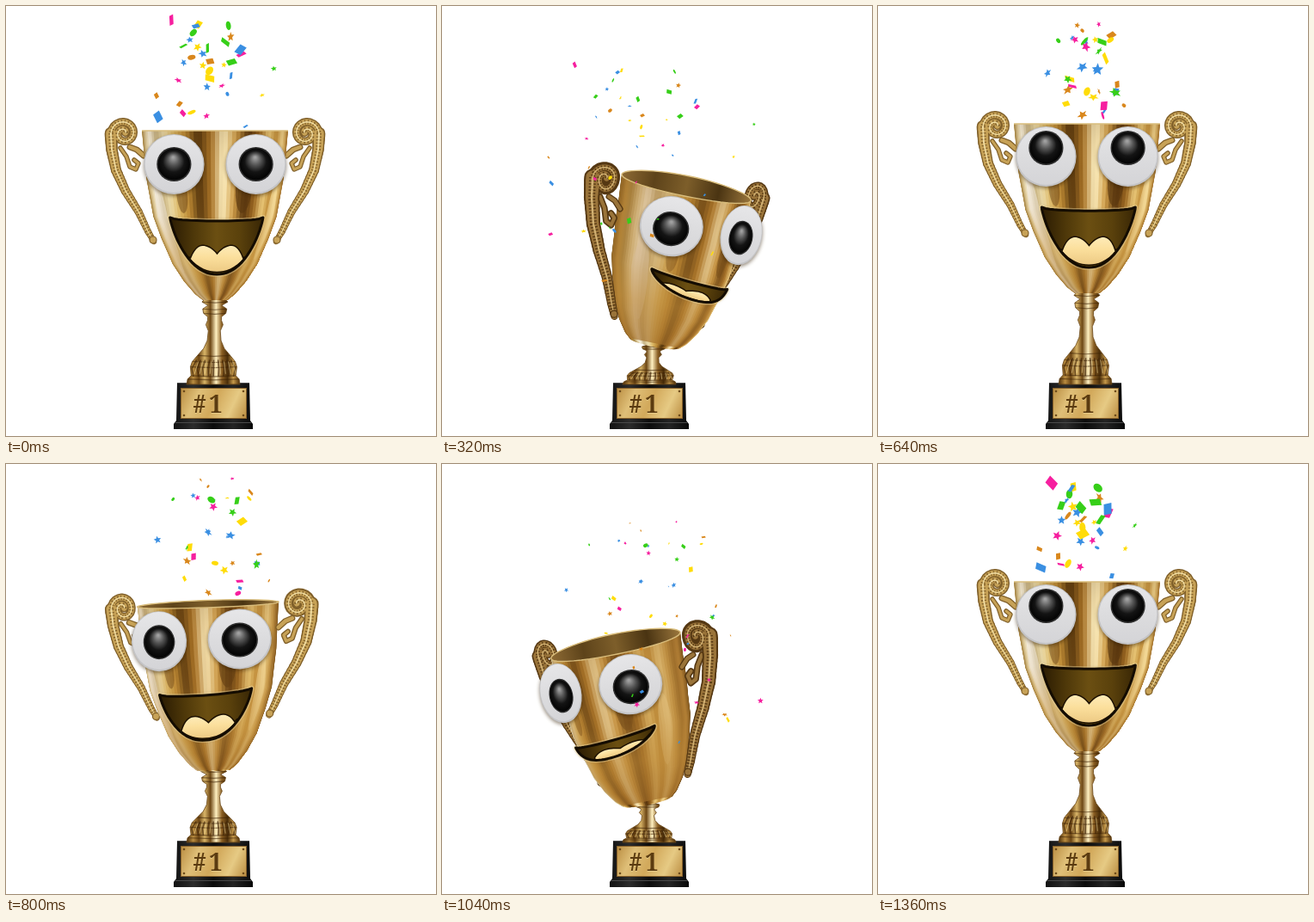
Recreate the animation shown at these times as an HTML page with a canvas. Size 500 by 500 pixels, loop 1440 ms.

```html
<!DOCTYPE html>
<html lang="en">
<head>
<meta charset="utf-8">
<title>Trophy</title>
<style>
html, body { margin: 0; width: 100%; height: 100%; overflow: hidden; background: #fff; }
canvas { position: absolute; left: 0; top: 0; width: 500px; height: 500px; }
span {
  position: absolute; left: 196px; top: 442px; width: 80px; text-align: center;
  font: 600 28px/40px "Noto Serif", serif; letter-spacing: 3px; color: #5b3b10;
  text-shadow: 0 1px 0 #e8cc88;
}
</style>
</head>
<body>
<canvas id="stage" width="500" height="500"></canvas><span>#1</span>
<script>
const ctx = document.getElementById('stage').getContext('2d');
const STEP = 80, HALF = 9, STEPS = 18, DEG = Math.PI / 180;
const { sin, cos, abs, min, max, PI } = Math;

// One sway: cup bottom, roll, yaw, pitch, mouth depth, face shift, eye shift, pupil shift
const SWAY = [
  [342, 0, 0, 0, 66, 0, 0, 0],
  [356, 2, 9, 3, 57, 0, 0, 1],
  [369, 4, 17, 5, 49, 0, 0, 3],
  [382, 8, 23, 8, 34, 2, 0, 3],
  [392, 11.5, 27, 9, 22, 3, 0, 3],
  [360, 6, 15, 5, 50, 0, 0, 0],
  [319, 0, 0, 0, 78, -10, -11, -6],
  [326, 0, 0, 0, 73, -7, -6, -11],
  [334, 0, 0, 0, 70, -4, -1, -10]
];
const CUP = [[0, 84], [55, 79], [100, 71], [125, 62], [155, 49], [175, 36], [190, 23], [197, 14]];
const STEM = [[0, 11], [4, 15], [8, 8], [12, 14], [17, 13], [21, 8], [25, 8], [30, 10], [37, 7],
  [48, 8], [57, 12], [65, 19], [72, 25], [78, 27], [88, 26], [92, 30], [98, 31]];
const BAND = [[-120, 22], [-115, 46], [-104, 70], [-89, 94], [-78, 117], [-71, 129]];
const GOLD = ('8c6426 b5893c a58648 dcc896 fbf6e6 c4b183 efe0b0 dcb864 b98632 4f300a a87226 ' +
  'fff3c6 cf9d48 512f0a 97631f edcd7e c08c38 f3d792 cb9f50 94682a b3823a 7a5520')
  .split(' ').map(h => [0, 2, 4].map(i => parseInt(h.substr(i, 2), 16)));
const PAPER = ['#d9871c', '#3a8fe2', '#f61f9f', '#36cf18', '#ffdc08'];

const mix = (a, b, t) => a + (b - a) * t;

function radius(y) {
  let i = 1;
  while (i < CUP.length - 1 && CUP[i][0] < y) i++;
  const [a, b] = [CUP[i - 1], CUP[i]];
  return mix(a[1], b[1], min(1, (y - a[0]) / (b[0] - a[0])));
}

function goldAt(deg) {
  const f = min(0.999, max(0, (deg + 95) / 190)) * (GOLD.length - 1), i = f | 0;
  return `rgb(${GOLD[i].map((c, n) => mix(c, GOLD[i + 1][n], f - i) | 0)})`;
}

function rng(seed) {
  return () => {
    seed = (seed + 0x6d2b79f5) | 0;
    let t = Math.imul(seed ^ (seed >>> 15), 1 | seed);
    t = (t + Math.imul(t ^ (t >>> 7), 61 | t)) ^ t;
    return ((t ^ (t >>> 14)) >>> 0) / 4294967296;
  };
}

function trace(pts, close = true) {
  ctx.beginPath();
  pts.forEach(p => ctx.lineTo(p[0], p[1]));
  if (close) ctx.closePath();
}

function fill(style) { ctx.fillStyle = style; ctx.fill(); }
function stroke(style, width) { ctx.strokeStyle = style; ctx.lineWidth = width; ctx.stroke(); }

function ramp(x0, y0, x1, y1, colors) {
  const g = ctx.createLinearGradient(x0, y0, x1, y1);
  colors.forEach((c, i) => g.addColorStop(i / (colors.length - 1), c));
  return g;
}

const range = (n, fn) => Array.from({ length: n + 1 }, (_, i) => fn(i / n));

function makePose(step) {
  const side = step < HALF ? 1 : -1;
  const [by, roll, yaw, pitch, mouth, face, eye, pupil] = SWAY[step % HALF];
  const r = roll * side * DEG, psi = yaw * side, p = sin(pitch * DEG), tilt = yaw / 27;
  const h = 1 - pitch * 0.006, bx = 243 + side * yaw * 0.16;
  // Point on the turned cup, in view space
  const view = (X, y, Z) => {
    X *= 1 + Z / 550;
    const Y = (y - 197) * h + Z * p;
    return [bx + X * cos(r) - Y * sin(r), by + X * sin(r) + Y * cos(r)];
  };
  // Squashing narrows the rim and swells the bottom
  const girth = y => radius(y) + tilt * mix(-8, 15, (y / 197) ** 2);
  const around = (deg, y, R = girth(y)) => view(R * sin(deg * DEG), y, R * cos(deg * DEG));
  const flat = (x, y) => view(x * cos(psi * DEG), y, -x * sin(psi * DEG));
  return { by, bx, r, psi, p, mouth, face, eye, pupil, view, around, flat, tilt, side };
}

function drawBase() {
  trace([[199, 438], [283, 438], [284, 482], [287, 486], [287, 492], [195, 492], [195, 486], [198, 482]]);
  fill(ramp(195, 0, 287, 0, ['#111', '#2c2c2c', '#0c0c0c', '#242424', '#080808']));
  ctx.fillStyle = '#4a4a4a';
  ctx.fillRect(199, 438, 84, 1);
  ctx.fillRect(197, 484, 88, 1);
  ctx.fillStyle = ramp(203, 444, 280, 480, ['#b98c40', '#dfbf78', '#d2a95b', '#e6ca84', '#b98b3f']);
  ctx.fillRect(203, 444, 77, 36);
  ctx.strokeStyle = '#86602a';
  ctx.lineWidth = 1;
  ctx.strokeRect(203.5, 444.5, 76, 35);
  for (const x of [207, 276]) for (const y of [448, 476]) {
    ctx.beginPath();
    ctx.arc(x, y, 1.3, 0, 7);
    fill('#6e4c1c');
  }
}

function drawStem(pose) {
  const k = max(0.46, (442 - pose.by) / 98);
  const at = (y, x) => [mix(241, pose.bx, (98 - y) / 98) + x, 440 - (98 - y) * k];
  trace([...STEM.map(([y, w]) => at(y, w)), ...STEM.slice().reverse().map(([y, w]) => at(y, -w))]);
  fill(ramp(211, 0, 271, 0, ['#5a3a10', '#b98c40', '#6b4514', '#d9b568', '#6e4816', '#fff0c0', '#8a5e22', '#4a2e0a', '#c6994a', '#5a3a10']));
  stroke('#6b4a1c', 0.8);
  ctx.save();
  ctx.clip();
  for (const [y, w] of STEM.filter(s => s[1] > 12)) {
    trace([at(y, -w), at(y + 1, 0), at(y, w)], false);
    stroke('rgba(60,34,5,.55)', 1.2);
  }
  for (let i = -4; i <= 4; i++) {
    trace([at(70, i * 5), at(80, i * 6.3), at(89, i * 5.8)], false);
    stroke('rgba(65,38,8,.65)', 1.6);
    trace([at(72, i * 5 + 2), at(86, i * 6 + 2)], false);
    stroke('rgba(255,235,170,.5)', 1);
  }
  ctx.restore();
}

function drawHandle(pose, side) {
  const { tilt } = pose, near = side * pose.psi < 0;
  const spiral = range(30, t => {
    const a = mix(3.9, 1, t) * PI, R = mix(2, 15, t ** 0.8);
    return [-106 + R * cos(a), 3 + R * sin(a)];
  });
  const band = [];
  for (let i = 0; i < BAND.length; i++) {
    const a = i ? BAND[i - 1] : spiral[30];
    for (let n = 1; n <= 5; n++) band.push([mix(a[0], BAND[i][0], n / 5), mix(a[1], BAND[i][1], n / 5)]);
  }
  // The lower end stretches down and tucks in as the cup leans
  const put = ([x, y]) => pose.flat(
    -side * x * (1 - tilt * (0.07 + 0.0011 * max(0, y))),
    y * (y > 0 ? 1 + 0.32 * tilt * tilt : 1));
  const curl = spiral.map(put), arm = [[-99, 19], [-91, 22], [-83, 29]].map(put);
  const leaf = [[-110, 20], [-103, 30], [-99, 42], [-92, 45], [-89, 38], [-94, 34]].map(put);
  const rail = [curl[30], ...band.map(put)];
  const bulk = near ? 1 + 0.35 * tilt : 1;
  const width = i => mix(15, 6, i / rail.length) * bulk;
  const [edge, gold, light] = tilt > 0.8 ? ['#553813', '#9a743a', '#d2b274'] : ['#80602a', '#c7a257', '#f0dca2'];
  const rib = (grow, color) => {
    for (let i = 1; i < rail.length; i++) {
      trace([rail[i - 1], rail[i]], false);
      stroke(color, max(0.8, width(i) * grow));
    }
  };
  ctx.save();
  ctx.lineCap = ctx.lineJoin = 'round';
  trace(arm, false); stroke(edge, 7); stroke(gold, 4.5);
  trace(leaf, false); stroke(edge, 5.5 * bulk); stroke(gold, 3 * bulk);
  trace(curl, false); stroke(edge, 9.5 * bulk);
  rib(1, edge);
  trace(curl, false); stroke(gold, 6.5);
  rib(0.78, gold);
  ctx.lineCap = 'butt';
  ctx.setLineDash([1.4, 2.2]);
  trace(curl, false); stroke(edge, 5);
  trace(rail, false); stroke(edge, 6 * bulk);
  ctx.setLineDash([]);
  trace(curl, false); stroke(light, 1.4);
  rib(0.14, light);
  const tip = put([-72, 127]);
  ctx.beginPath();
  ctx.arc(tip[0], tip[1], 4, 0, 7);
  fill(gold);
  stroke(edge, 1.2);
  ctx.restore();
}

function drawPatch(pose, deg, y0, y1, wide, color) {
  const a = deg + pose.psi;
  trace(range(24, t => pose.around(a + wide * sin(t * 2 * PI), mix(y0, y1, (1 - cos(t * 2 * PI)) / 2))));
  fill(color);
}

function drawCup(pose) {
  const ys = CUP.map(c => c[0]).concat(28, 78, 140, 165).sort((a, b) => a - b);
  const rightEdge = ys.map(y => pose.around(90, y)).reverse();
  for (let a = -90; a < 90; a += 3) {
    const front = range(8, t => pose.around(mix(90, a, t), 0));
    trace([...front, ...ys.map(y => pose.around(a, y)), ...rightEdge]);
    fill(goldAt(a - pose.psi));
  }
  ctx.save();
  trace([...range(24, t => pose.around(mix(90, -90, t), 0)), ...ys.map(y => pose.around(-90, y)), ...rightEdge]);
  ctx.clip();
  drawPatch(pose, -54, 62, 165, 9, 'rgba(240,236,228,.55)');
  drawPatch(pose, 23, 40, 96, 7, 'rgba(80,46,10,.65)');
  drawPatch(pose, -27, 55, 96, 5, 'rgba(100,62,18,.5)');
  drawPatch(pose, 58, 60, 150, 7, 'rgba(255,236,176,.5)');
  const top = pose.view(0, 0, 0), end = pose.view(0, 197, 0);
  ctx.fillStyle = ramp(...top, ...end, ['rgba(90,56,14,.15)', 'rgba(200,150,66,0)', 'rgba(200,150,66,.1)', 'rgba(196,146,62,.5)', 'rgba(150,100,36,.5)']);
  ctx.fillRect(0, 0, 500, 500);
  ctx.fillStyle = `rgba(176,122,46,${0.35 * pose.tilt})`;
  ctx.fillRect(0, 0, 500, 500);
  ctx.restore();

  trace(range(48, t => pose.around(t * 360, 0)));
  if (pose.p > 0) fill(ramp(...pose.around(-90, 0), ...pose.around(90, 0), ['#8d6a34', '#5d431a', '#7d5e2a', '#4a3412', '#9a763c']));
  stroke('#d9bd7c', 1.4);
}

function drawEye(pose, deg) {
  const a = deg + pose.psi;
  const [x, y] = pose.around(a, 39 + pose.eye, 80);
  const sx = min(1.06, 0.2 + 0.95 * cos(a * DEG));
  ctx.save();
  ctx.translate(x, y);
  ctx.rotate(pose.r);
  ctx.scale(sx, 1);
  const disc = (cy, R, style) => {
    ctx.beginPath();
    ctx.arc(0, cy, R, 0, 7);
    fill(style);
  };
  ctx.shadowColor = 'rgba(50,28,0,.5)';
  ctx.shadowBlur = 4;
  ctx.shadowOffsetY = 2;
  disc(0, 35, '#c4c4c6');
  ctx.shadowColor = 'transparent';
  disc(-0.6, 33.5, ramp(0, -34, 0, 34, ['#e6e6e8', '#dcdcde', '#d4d4d7']));
  const py = pose.pupil;
  disc(py, 20, '#2e2e2e');
  const g = ctx.createRadialGradient(-1, py - 8, 1, 0, py, 20);
  g.addColorStop(0, '#a0a0a0');
  g.addColorStop(0.3, '#555');
  g.addColorStop(0.6, '#141414');
  g.addColorStop(1, '#000');
  disc(py, 18.5, g);
  ctx.restore();
}

function drawMouth(pose) {
  const top = 101 + pose.face, depth = pose.mouth, lean = pose.side * pose.tilt;
  const at = (u, d) => {
    const y = top + d * depth;
    return pose.around(2 + u * 44 + pose.psi, y + 7 * u * lean, (radius(min(y, 190)) + 72) / 2);
  };
  const low = u => max(0, 1 - abs(u) ** 2.2) ** 0.65;
  const shape = [
    ...range(20, t => at(mix(-1, 1, t), 0.06 * low(mix(-1, 1, t)))),
    ...range(40, t => at(cos(t * PI), low(cos(t * PI))))
  ];
  ctx.save();
  ctx.lineJoin = 'round';
  trace(shape);
  stroke('rgba(255,232,170,.45)', 6);
  ctx.shadowColor = 'rgba(50,28,0,.6)';
  ctx.shadowBlur = 4;
  fill(ramp(...at(-1, 0), ...at(1, 0), ['#2a1b02', '#4d3709', '#6b4f12', '#5a410c', '#382605']));
  ctx.shadowColor = 'transparent';
  ctx.save();
  ctx.clip();
  const bump = u => 0.5 + 0.28 * (u < 0.3 ? 0.55 * ((0.3 - u) / 0.3) ** 2 : ((u - 0.3) / 0.33) ** 2);
  const slide = -0.25 * lean;
  trace([
    ...range(28, t => { const u = mix(-0.63, 0.63, t); return at(u + slide, bump(abs(u))); }),
    ...range(16, t => { const u = mix(0.63, -0.63, t) + slide; return at(u, 0.95 * low(u)); })
  ]);
  stroke('#1c1000', 3);
  fill(ramp(...at(0, 0.4), ...at(0, 1), ['#fff0c4', '#fbdf9c', '#eac680']));
  ctx.restore();
  trace(shape);
  stroke('#140c00', 3);
  ctx.restore();
}

function drawPiece(kind, size, turn, flip, color) {
  ctx.rotate(turn);
  ctx.scale(1, flip);
  if (kind < 0.45) {
    trace(range(9, t => {
      const n = Math.round(t * 9), R = n % 2 ? size * 0.45 : size;
      return [R * sin(n * PI / 5), -R * cos(n * PI / 5)];
    }));
  } else if (kind < 0.8) {
    trace([[-size, -size * 0.6], [size * 0.7, -size * 0.7], [size, size * 0.6], [-size * 0.7, size * 0.7]]);
  } else {
    ctx.beginPath();
    ctx.ellipse(0, 0, size * 0.8, size * 0.6, 0, 0, 7);
  }
  fill(color);
}

// Paper rises from the rim, then falls and shrinks
function drawBurst(age, seed, side) {
  const rand = rng(seed);
  for (let i = 0; i < 46; i++) {
    const spread = (rand() + rand() - 1) * 1.15, late = i > 35;
    const lift = late ? -0.1 - rand() * 0.6 : rand();
    const kind = rand(), big = mix(0.4, 1, rand()), spin = rand() * 6;
    const color = PAPER[rand() * 5 | 0], hue = rand();
    if (late && age < 6 || age === 8 && hue > 0.4 || age > 8 && hue > 0.15) continue;
    const x = 243 + spread * (28 + 12 * age) - (late ? side * 25 : 0);
    const y = mix(123 + 2 * age * age, 14 + 3.8 * (age - 3.3) ** 2, lift);
    ctx.save();
    ctx.translate(x, y);
    drawPiece(kind, big * (9.5 - 0.82 * age), spin + age * 0.7, 0.35 + 0.65 * abs(cos(spin * 3 + age)), color);
    ctx.restore();
  }
}

function draw(step) {
  const pose = makePose(step);
  const bursts = [6, 15].map((start, i) => ({ age: (step - start + STEPS) % STEPS, seed: 41 + i * 30, side: i ? -1 : 1 }))
    .filter(b => b.age <= 9);
  const paper = front => bursts.filter(b => (b.age > 4) === front).forEach(b => drawBurst(b.age, b.seed, pose.side));
  const near = side => side * pose.psi < 0;
  const handles = front => [-1, 1].filter(s => near(s) === front).forEach(s => drawHandle(pose, s));

  ctx.clearRect(0, 0, 500, 500);
  paper(false);
  drawBase();
  drawStem(pose);
  handles(false);
  drawCup(pose);
  handles(true);
  drawMouth(pose);
  drawEye(pose, -32);
  drawEye(pose, 32);
  paper(true);
}

let shown = -1;
function tick() {
  const step = Math.floor(performance.now() / STEP) % STEPS;
  if (step !== shown) draw(shown = step);
  requestAnimationFrame(tick);
}
tick();
</script>
</body>
</html>
```
